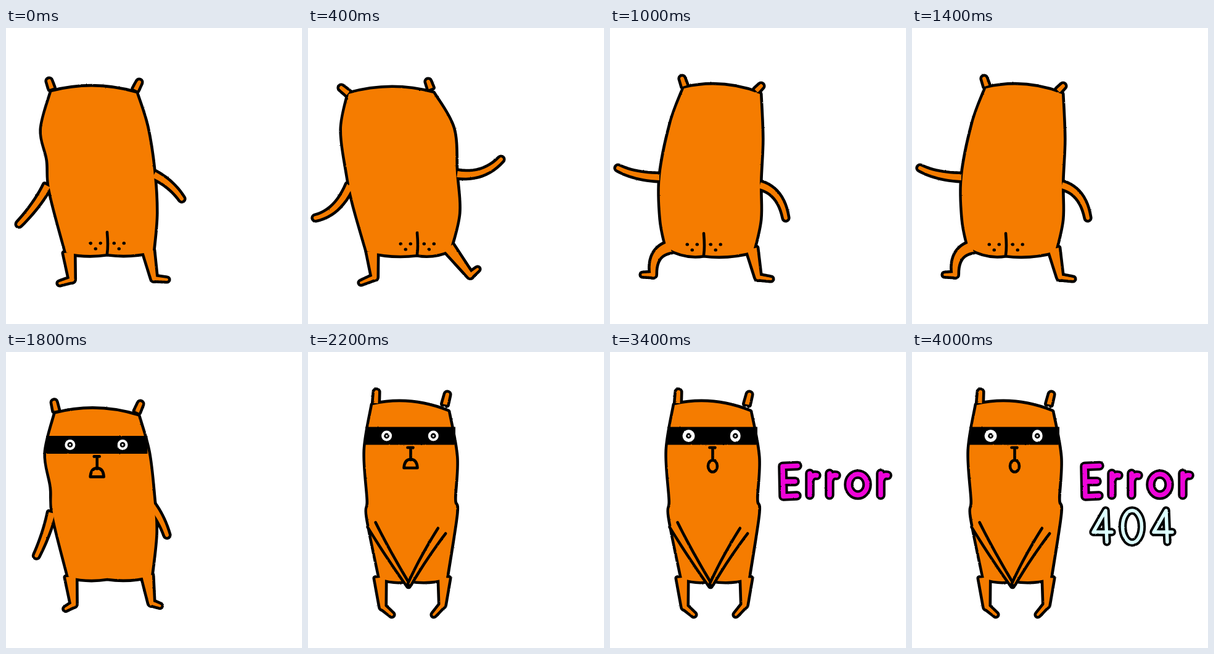
Animation, 480 px wide and 480 px high, one loop 4.4 s. Source, as an HTML page:

```html
<!DOCTYPE html>
<html lang="en">
<head>
<meta charset="utf-8">
<title>Error 404</title>
<style>
  html, body { margin: 0; width: 100%; height: 100%; overflow: hidden; background: #fff; }
  svg { display: block; width: 100vw; height: 100vh; }
  path { fill: none; stroke: #000; stroke-width: 4.6; stroke-linecap: round; stroke-linejoin: round; }
  .rim { stroke-width: 9.2; }
  .skin { fill: #f57c00; stroke: none; }
  .arm { fill: #f57c00; }
  .dot { stroke-width: 5; }
  .mask { stroke-width: 29; stroke-linecap: butt; }
  .edge { stroke-width: 15.5; }
  .edge.thin { stroke-width: 13.5; }
  .pink { stroke: #ee04d8; stroke-width: 7.5; }
  .ice { stroke: #dcffff; stroke-width: 5.5; }
</style>
</head>
<body>
<svg viewBox="0 0 480 480" role="img" aria-label="Error 404">
  <filter id="rough" filterUnits="userSpaceOnUse" x="0" y="0" width="480" height="480" color-interpolation-filters="sRGB">
    <feTurbulence type="fractalNoise" baseFrequency=".3" numOctaves="2" seed="4"/>
    <feDisplacementMap in="SourceGraphic" scale="1.8" xChannelSelector="R" yChannelSelector="G"/>
  </filter>
  <g id="art" filter="url(#rough)"></g>
</svg>
<script>
const art = document.getElementById('art');

function add(parent, tag, attrs) {
  const el = document.createElementNS('http://www.w3.org/2000/svg', tag);
  for (const k in attrs) el.setAttribute(k, attrs[k]);
  return parent.appendChild(el);
}

const lerp = (a, b, t) => a + (b - a) * t;
const points = text => text.split(' ').map(s => s.split(',').map(Number));
const blend = (a, b, t) => Array.isArray(a) ? a.map((v, i) => blend(v, b[i], t)) : lerp(a, b, t);

// Each pose: both sides from shoulder to hip, the cleft, and left/right limbs.
function pose(left, right, cleft, ears, arms, legs) {
  const pair = list => list.map(points);
  return { sides: pair([left, right]), cleft: points(cleft)[0], ears: pair(ears), arms: pair(arms), legs: pair(legs) };
}

const stand = pose(
  '74,104 58,165 68,214 72,265 98,364', '211,106 228,160 239,230 243,300 238,362', '164,366',
  ['74,98 70,86', '210,100 216,88'],
  ['67,256 50,288 21,318', '240,238 268,252 285,277'],
  ['102,364 107,408 87,414', '231,362 240,406 261,408']);
const lean = pose(
  '66,107 55,165 64,235 74,285 96,362', '203,106 235,163 240,235 244,300 230,360', '177,367',
  ['65,106 54,97', '199,98 195,87'],
  ['68,255 48,300 12,308', '242,237 285,243 313,213'],
  ['104,362 108,404 86,413', '228,356 263,401 275,391']);
const sway = pose(
  '120,98 99,155 82,240 83,310 92,356', '243,107 246,180 243,250 243,310 232,362', '152,368',
  ['121,94 117,82', '237,102 245,94'],
  ['80,242 40,241 13,227', '243,255 277,264 285,308'],
  ['98,355 67,362 70,400 53,400', '230,358 240,404 261,407']);
const front = pose(
  '105,86 93,160 98,240 97,268 117,367', '227,97 240,170 237,238 240,262 224,367', '165,370',
  ['110,83 111,65', '222,85 226,69'],
  ['103,280 129,327 163,379', '217,290 186,335 165,376'],
  ['117,366 121,413 136,426', '221,366 218,410 204,426']);

function towardFront(t) {
  const out = {};
  for (const k in stand) out[k] = blend(stand[k], front[k], t);
  return out;
}

function curve(p) {
  return p.slice(1).map((c, i) => {
    const b = p[i], a = p[i - 1] || b, e = p[i + 2] || c;
    return `C${b.map((v, k) => v + (c[k] - a[k]) / 6)} ${c.map((v, k) => v - (e[k] - b[k]) / 6)} ${c}`;
  }).join('');
}

function torso({ sides: [l, r], cleft }) {
  const tl = l[0], bl = l[l.length - 1], br = r[r.length - 1];
  const cheek = end => [(end[0] + cleft[0]) / 2, cleft[1] + 5];
  return `M${tl}Q${[(tl[0] + r[0][0]) / 2, (tl[1] + r[0][1]) / 2 - 19]} ${r[0]}${curve(r)}` +
    `Q${cheek(br)} ${cleft}Q${cheek(bl)} ${bl}${curve([...l].reverse())}Z`;
}

function bezier(p, t) {
  while (p.length > 1) p = p.slice(1).map((q, i) => blend(p[i], q, t));
  return p[0];
}

// Tapered tube along a Bezier, open at its root and round at its tip.
function limb(p, w0, w1) {
  const near = [], far = [], n = 12;
  for (let i = 0; i <= n; i++) {
    const t = i / n, [x, y] = bezier(p, t);
    const a = bezier(p, Math.max(0, t - .01)), b = bezier(p, Math.min(1, t + .01));
    const dx = b[0] - a[0], dy = b[1] - a[1], k = lerp(w0, w1, t) / 2 / Math.hypot(dx, dy);
    near.push([x - dy * k, y + dx * k]);
    far.unshift([x + dy * k, y - dx * k]);
  }
  return `M${near.join('L')}A${w1 / 2} ${w1 / 2} 0 0 0 ${far.join('L')}`;
}

function drawBack(put, [x, y]) {
  put('line', `M${x} ${y - 35}Q${x + 2} ${y - 12} ${x} ${y}`);
  for (const side of [-1, 1])
    for (let i = 0; i < 3; i++)
      put('dot', `M${x + side * (11 + 8 * i)} ${y - 17 + i % 2 * 9}h.5`);
}

function drawFace(g, put, { sides: [l, r] }, shock) {
  const x0 = l[1][0], x1 = r[1][0], y = l[0][1] + 50;
  const x = lerp(x0, x1, .5), size = shock ? 10 : 8.5;
  put('mask', `M${x0} ${y}H${x1 - 1}`);
  for (const t of [.235, .75]) {
    const cx = lerp(x0, x1, t);
    add(g, 'ellipse', { cx, cy: y, rx: size - (shock && t > .5 ? 1.5 : 0), ry: size, fill: '#fff' });
    add(g, 'circle', { cx, cy: y, r: 3, fill: '#fff', stroke: '#000', 'stroke-width': 2.8 });
  }
  put('line', `M${x - 5} ${y + 19}h9M${x} ${y + 20}v19`);
  put('line', shock ? oval(x, y + 49, 7.5, 9.5) : `M${x - 11} ${y + 52}q1 -14 11 -14t11 14z`);
}

function drawFigure(p, { face, shock, hug }) {
  const g = add(art, 'g', {});
  const put = (cls, d) => add(g, 'path', { class: cls, d });
  const shapes = [torso(p)];
  for (const ear of p.ears) shapes.push(limb(ear, 7, 6));
  for (const leg of p.legs) shapes.push(limb(leg.slice(0, -1), 16, 7), limb(leg.slice(-2), 6, 4));
  if (!hug) for (const arm of p.arms) shapes.push(limb(arm, 10, 6));
  for (const cls of ['rim', 'skin']) for (const d of shapes) put(cls, d);
  if (hug) for (const arm of p.arms) put('arm', limb(arm, 15, 6));
  if (face) drawFace(g, put, p, shock);
  else drawBack(put, p.cleft);
  return g;
}

const oval = (x, y, rx, ry) => `M${x - rx} ${y}a${rx} ${ry} 0 1 1 ${2 * rx} 0a${rx} ${ry} 0 1 1 ${-2 * rx} 0`;
const smallR = (x, y) => `M${x} ${y}v35M${x} ${y + 12}q3 -11 11 -9`;
const four = x => `M${x + 2} 308L${x} 257L${x - 20} 292H${x + 10}`;

const views = {
  stand: drawFigure(stand, {}),
  sway: drawFigure(sway, {}),
  lean: drawFigure(lean, {}),
  turn: drawFigure(towardFront(.15), {}),
  peek: drawFigure(towardFront(.2), { face: true }),
  reach: drawFigure(towardFront(.35), { face: true }),
  cover: drawFigure(front, { face: true, hug: true }),
  shock: drawFigure(front, { face: true, hug: true, shock: true })
};

const word = ['M304 184.5L280 185.5L281 234L303 233M281 210H300',
  smallR(324, 197), smallR(356, 197), oval(402, 215, 15, 17), smallR(439, 197)];
const number = [four(314), oval(357, 283, 15.5, 26), four(412)];

const letters = [...word, ...number].map((d, i) => {
  const g = add(art, 'g', {}), pink = i < word.length;
  add(g, 'path', { class: pink ? 'edge' : 'edge thin', d });
  add(g, 'path', { class: pink ? 'pink' : 'ice', d });
  return g;
});

const order = 'stand sway lean sway stand sway lean sway turn peek reach cover shock'.split(' ');
const STEP = 200, LOOP = 4400;
let shown = -1;

function show(step) {
  const now = order[Math.min(step, order.length - 1)];
  for (const name in views) views[name].style.display = name === now ? '' : 'none';
  letters.forEach((g, i) => { g.style.display = step >= order.length + i ? '' : 'none'; });
}

function tick() {
  const step = Math.floor(performance.now() % LOOP / STEP);
  if (step !== shown) show(shown = step);
  requestAnimationFrame(tick);
}
tick();
</script>
</body>
</html>
```
